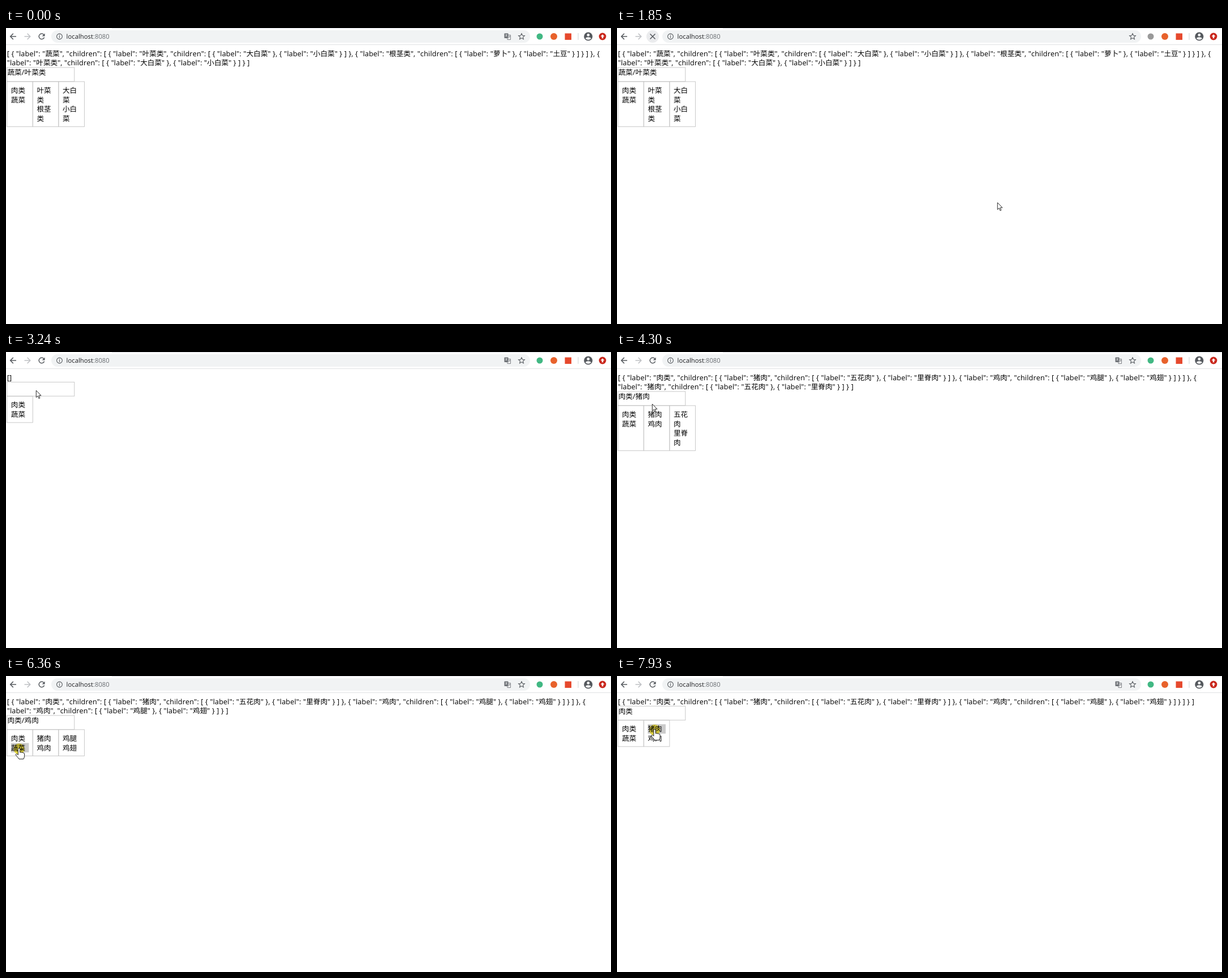
These frames come from a looping animation (1069 px wide and 524 px high, 8 s). An HTML page:

```html
<!DOCTYPE html>
<html lang="zh-CN">
<head>
<meta charset="utf-8">
<title>Cascader</title>
<style>
html, body { margin: 0; width: 100%; height: 100%; overflow: hidden; background: #fff; }
svg { display: block; }
text {
  font: 12.64px "Open Sans", "Noto Sans CJK SC", "Noto Sans CJK", sans-serif;
  letter-spacing: .154px;
  font-kerning: none;
  text-rendering: geometricPrecision;
  fill: #000;
}
.han { letter-spacing: 0; }
.url { font-size: 11.3px; letter-spacing: 0; fill: #202124; }
.dim { fill: #6b6f74; }
.box { fill: none; stroke: #c6c6c6; stroke-width: .95; }
.icon { fill: none; stroke: #55595e; stroke-width: 1.5; }
#click { fill: #fff04a; mix-blend-mode: multiply; }
</style>
</head>
<body>
<svg width="1069" height="524" viewBox="0 0 1069 524">
  <rect width="1069" height="524" fill="#fff"/>
  <rect x="187" width="882" height="1" fill="#dee1e6"/>
  <rect y="29" width="1069" height="1" fill="#dfe1e4"/>
  <rect x="80" y="4" width="846" height="22" rx="11" fill="#f1f3f4"/>
  <path class="icon" d="M18 15H8M12.8 9.9L7.7 15l5.1 5.1"/>
  <path class="icon" d="M32.5 15h10M37.7 9.9l5.1 5.1-5.1 5.1" style="stroke:#bfc1c4"/>
  <g id="reload">
    <path class="icon" d="M66.7 11.8A4.8 4.8 0 1 0 67.6 16.4"/>
    <path d="M68.6 9.4v5h-5z" fill="#55595e"/>
  </g>
  <g id="stop">
    <circle cx="63" cy="15" r="11" fill="#ebecee"/>
    <path class="icon" d="M58.5 10.5l9 9M67.5 10.5l-9 9"/>
  </g>
  <circle class="icon" cx="94.5" cy="15" r="4.9" style="stroke-width:1.1"/>
  <path class="icon" d="M94.5 14.3v3.2M94.5 12v1.2" style="stroke-width:1.2"/>
  <text class="url" x="106.6" y="18.7">localhost<tspan class="dim">:8080</tspan></text>
  <g id="translate">
    <path d="M885 12.5h6.5v8H886z" fill="#fff" stroke="#6b6f74" stroke-width=".9"/>
    <rect x="880.5" y="9.5" width="7" height="8.5" rx=".8" fill="#6b6f74"/>
    <path d="M882.3 12h3.4M884 11v1M882.4 15.5l2.8-3.4M882.9 13l2.6 2.5" stroke="#fff" stroke-width=".7"/>
    <path d="M887.8 15h3M889.3 14v1M887.8 18.6l2.4-3.4" stroke="#6b6f74" stroke-width=".8"/>
  </g>
  <path class="icon" style="stroke-width:1.1" d="M911 9.8l1.6 3.5 3.8.4-2.9 2.5.9 3.7-3.4-2-3.4 2 .9-3.7-2.9-2.5 3.8-.4z"/>
  <circle id="badge" cx="943" cy="15" r="5.5"/>
  <circle cx="968" cy="15" r="6" fill="#e8622c"/>
  <rect x="987.5" y="9.5" width="11.5" height="11.5" fill="#e6492d"/>
  <rect x="1010.5" y="9" width="1" height="12" fill="#cfd1d4"/>
  <circle cx="1028.8" cy="15" r="7.6" fill="#55595e"/>
  <circle cx="1028.8" cy="12.4" r="2.4" fill="#fff"/>
  <path d="M1024 18.8q0-2.6 4.8-2.6t4.8 2.6q-1.7 2-4.8 2t-4.8-2z" fill="#fff"/>
  <circle cx="1054" cy="15" r="6.4" fill="#c9271c"/>
  <path d="M1054 11.2l3.4 3.7h-2.1v3.3h-2.6v-3.3h-2.1z" fill="#fff"/>

  <rect id="hover" width="31.6" fill="#cbcbcb"/>
  <g id="page"></g>
  <circle id="click" r="9.6"/>
  <g id="cursor" fill="#fff" stroke="#111" stroke-width=".9" stroke-linejoin="round">
    <path id="arrow" d="M.3 0V12.4L3.1 9.8 5 14.3 6.9 13.5 5 9.1H9Z"/>
    <path id="hand" transform="scale(1.2)" stroke-width=".8" d="M-1.4 9V.4a1.4 1.4 0 0 1 2.8 0V5.2q1.3-.9 2.3.3 1.4-.8 2.3.4 1.9-.3 2 1.4V10.5q0 2.2-1.4 4.5H0Q-2.2 12-4.6 9.2-5.4 7.6-3.8 7.2-2.6 7.2-1.4 9Z"/>
  </g>
</svg>
<script>
const LOOP = 8000, ROW = 16.6, COL = 45.6, LEFT = 1.7, PAD = 7.1, TOP = 53.3;
const $ = id => document.getElementById(id);
const node = (label, ...children) => ({ label, children });

const tree = [
  node('肉类', node('猪肉', node('五花肉'), node('里脊肉')),
               node('鸡肉', node('鸡腿'), node('鸡翅'))),
  node('蔬菜', node('叶菜类', node('大白菜'), node('小白菜')),
               node('根茎类', node('萝卜'), node('土豆')))
];

// [time, chosen path, list open]; a null path is a blank page
const states = [
  [0, '蔬菜/叶菜类', true],
  [2020, null, false],
  [2100, '', false],
  [2950, '', true],
  [3640, '肉类', true],
  [4190, '肉类/猪肉', true],
  [4980, '肉类/猪肉/五花肉', true],
  [5750, '肉类/鸡肉', true],
  [6430, '蔬菜', true],
  [7440, '肉类', true]
];

// [start, end, steps, x, y]
const moves = [
  [130, 920, 11, 102, 80],
  [980, 1390, 6, 68, 18],
  [1620, 1850, 4, 672, 309],
  [1930, 2340, 6, 1020, 463],
  [2410, 2870, 7, 53, 62],
  [3240, 3240, 1, 53, 68],
  [3320, 3480, 3, 25, 94],
  [3800, 4030, 4, 62, 92],
  [4400, 4750, 5, 110, 111],
  [5280, 5500, 4, 67, 127.5],
  [6070, 6210, 3, 23, 129],
  [6970, 6970, 1, 23, 121],
  [7050, 7290, 4, 23, 95],
  [7610, 7760, 3, 66.5, 95.5]
];

const clicks = [[1390, 1540], [2870, 3010], [3560, 3720], [4110, 4250], [4900, 4980],
                [5670, 5900], [6360, 6590], [7290, 7440], [7930, 8000]];
const loading = [1540, 2260];
const within = (t, [a, b]) => t >= a && t < b;

const list = nodes => `[ ${nodes.map(json).join(', ')} ]`;
const json = n => `{ "label": "${n.label}"${n.children.length ? `, "children": ${list(n.children)}` : ''} }`;

function jsonLines(chosen) {
  if (!chosen.length) return ['[]'];
  const all = list(chosen);
  if (chosen.length === 1) return [all];
  const cut = json(chosen[0]).length + 5;
  return [all.slice(0, cut), all.slice(cut).trim()];
}

const text = (x, top, s) => `<text x="${x}" y="${top + 12.9}">` +
  s.replace(/[\u4e00-\u9fff]+/g, '<tspan class="han">$&</tspan>') + '</text>';
const box = (x, y, w, h) => `<rect class="box" x="${x}" y="${y}" width="${w}" height="${h}"/>`;

function layout([, path, open]) {
  if (path === null) return { html: '', items: [] };
  const chosen = [], cols = [tree], items = [];
  for (const label of path.split('/').filter(Boolean)) {
    const n = cols[chosen.length].find(c => c.label === label);
    chosen.push(n);
    if (n.children.length) cols.push(n.children);
  }
  const lines = jsonLines(chosen);
  const y = TOP + (lines.length - 1) * ROW, listY = y + 25;
  let html = lines.map((s, i) => text(LEFT, 36.6 + i * ROW, s)).join('');
  html += box(LEFT, y, 119.1, 24.8) + text(LEFT + .8, y + .6, path);
  if (open) {
    let rows = 0;
    cols.forEach((col, c) => {
      const x = LEFT + c * COL + PAD;
      let row = 0;
      for (const { label } of col) {
        const parts = label.match(/.{1,2}/g), top = listY + PAD + row * ROW;
        items.push({ x, y: top, h: parts.length * ROW });
        parts.forEach((p, i) => html += text(x, top + i * ROW, p));
        row += parts.length;
      }
      rows = Math.max(rows, row);
    });
    cols.forEach((_, c) => html += box(LEFT + c * COL, listY, COL, rows * ROW + 13.4));
  }
  return { html, items };
}

const views = states.map(layout);

function pointer(t) {
  let x = 960, y = 540;
  for (const [start, end, steps, toX, toY] of moves) {
    if (t < start) break;
    const gap = (end - start) / Math.max(1, steps - 1) || 1;
    const p = Math.min(1, (Math.floor((t - start) / gap + 1e-6) + 1) / steps);
    const e = 1 - (1 - p) ** 2;
    x += (toX - x) * e;
    y += (toY - y) * e;
  }
  return [x, y];
}

const show = (id, on) => { $(id).style.display = on ? '' : 'none'; };
const place = (id, x, y) => $(id).setAttribute('transform', `translate(${x} ${y})`);
let shown = -1;

function draw(t) {
  const index = states.findLastIndex(s => t >= s[0]);
  if (index !== shown) $('page').innerHTML = views[shown = index].html;

  const busy = within(t, loading);
  show('reload', !busy);
  show('stop', busy);
  show('translate', !busy);
  $('badge').setAttribute('fill', busy ? '#999' : '#41b883');

  const [x, y] = pointer(t);
  const over = views[index].items.find(i => x >= i.x && x < i.x + 31.6 && y >= i.y && y < i.y + i.h);
  show('hover', over);
  if (over) {
    place('hover', over.x, over.y);
    $('hover').setAttribute('height', over.h);
  }
  show('hand', over);
  show('arrow', !over);
  place('cursor', x, y);
  place('click', x, y);
  show('click', clicks.some(c => within(t, c)));
}

const begin = performance.now();
function tick() {
  draw((performance.now() - begin) % LOOP);
  requestAnimationFrame(tick);
}
tick();
</script>
</body>
</html>
```
